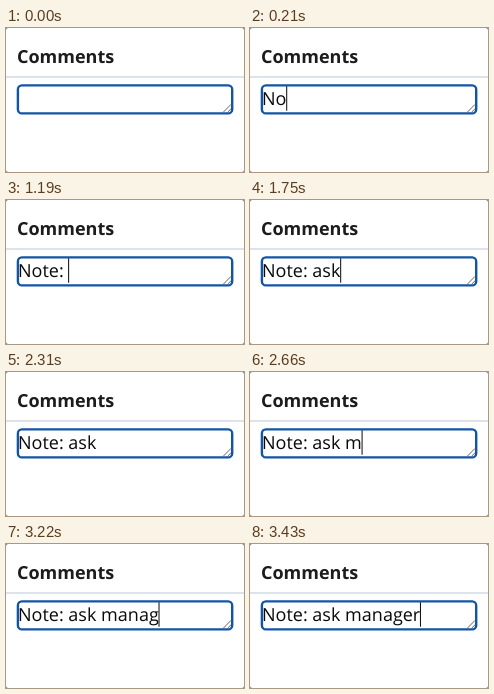
Recreate the animation shown at these times as an HTML page. Size 238x144 px, loop 3.5 s.

```html
<!DOCTYPE html>
<html lang="en">
<head>
<meta charset="utf-8">
<title>Comments</title>
<style>
  html, body { margin: 0; width: 100%; height: 100%; overflow: hidden; background: #777; }
  svg { display: block; }
  text {
    font: 18px "Open Sans", "Noto Sans", sans-serif;
    fill: #0a0a0a;
    text-rendering: geometricPrecision;
    white-space: pre;
  }
  .title { font-weight: 700; fill: #1c1c1c; }
</style>
</head>
<body>
<svg width="238" height="144" viewBox="0 0 238 144">
  <rect width="238" height="144" rx="2.5" fill="#fff"/>
  <text class="title" x="11" y="34.8">Comments</text>
  <rect y="48" width="238" height="2" fill="#dce3ea"/>
  <rect x="11.9" y="57.4" width="214.3" height="28" rx="4" fill="#fff" stroke="#1255a5" stroke-width="2.4"/>
  <path d="M217.3 84.2L225 76.4M221.6 84.2L225 80.8" stroke="#555" stroke-width="0.9" fill="none"/>
  <text id="note" x="12" y="76.9" xml:space="preserve"></text>
  <rect id="caret" y="58.3" width="1" height="24.4" fill="#0a0a0a"/>
</svg>
<script>
  const LOOP = 3500;
  const TICK = 70;
  const BLINK = 8 * TICK;
  const START_X = 12;
  const MESSAGE = "Note: ask manager";
  // Pause before each letter, in ticks
  const PAUSES = [1, 2, 2, 1, 5, 6, 2, 1, 5, 11, 2, 1, 2, 2, 3, 1, 2];

  const note = document.getElementById("note");
  const caret = document.getElementById("caret");
  const start = performance.now();

  function draw() {
    const time = Math.max(0, performance.now() - start) % LOOP;
    let count = 0;
    let lastKey = 0;
    while (count < PAUSES.length && lastKey + PAUSES[count] * TICK <= time) {
      lastKey += PAUSES[count++] * TICK;
    }
    // The caret goes out when the typist hesitates
    const visible = count > 0 && time - lastKey < BLINK;

    note.textContent = MESSAGE.slice(0, count);
    const width = count ? note.getComputedTextLength() : 0;
    caret.setAttribute("x", START_X + width - 0.25);
    caret.setAttribute("visibility", visible ? "visible" : "hidden");
    requestAnimationFrame(draw);
  }
  draw();
</script>
</body>
</html>
```
